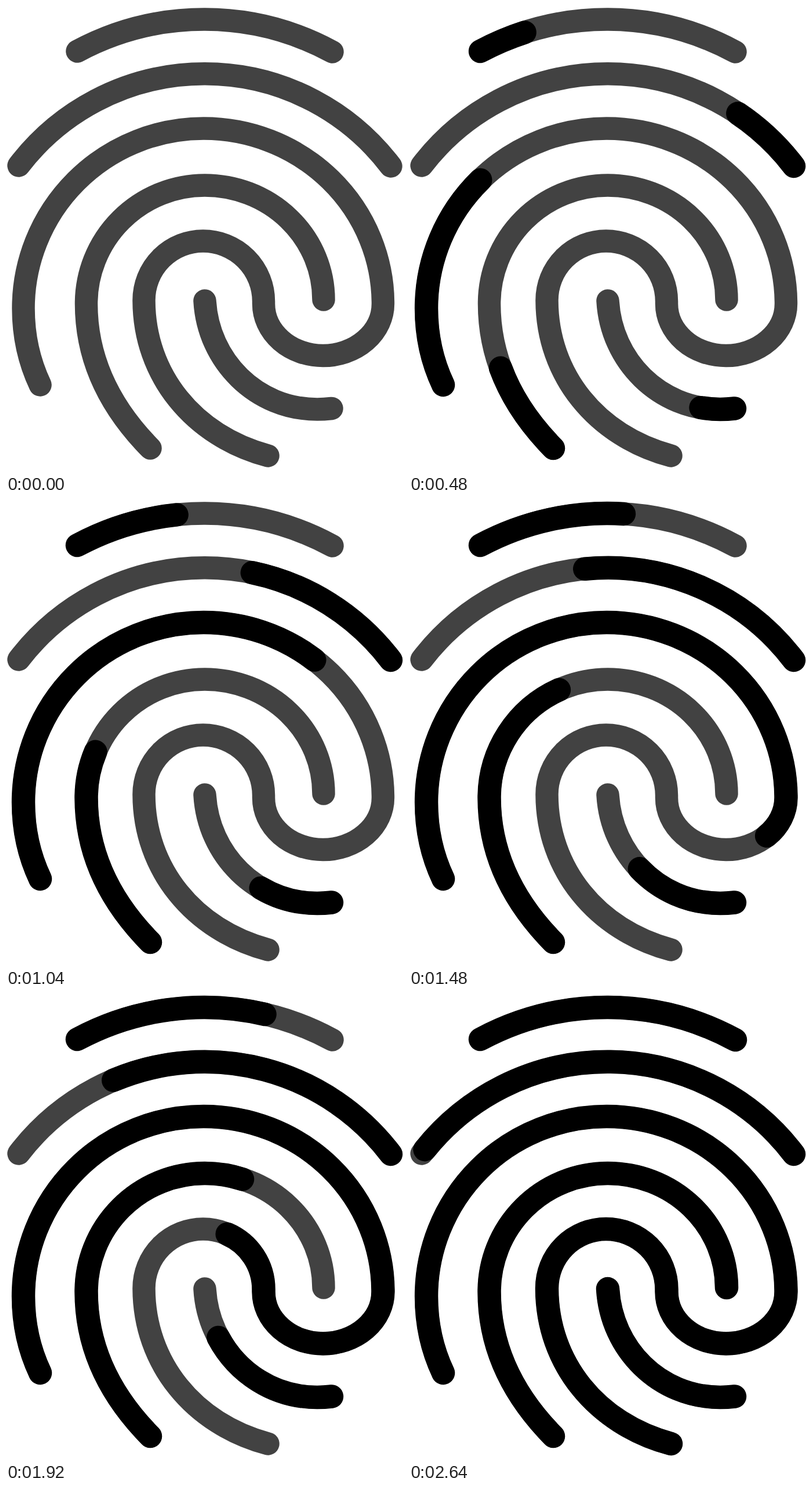
These frames come from a looping animation (685 px wide and 803 px high, 5000 ms). An HTML page:

```html
<!DOCTYPE html>
<html lang="en">
<head>
<meta charset="utf-8">
<title>Fingerprint scan</title>
<style>
  html, body { margin: 0; width: 100%; height: 100%; overflow: hidden; background: #fff; }
  svg { display: block; width: 685px; height: 803px; fill: none; stroke-linecap: round; }
  #base { stroke: #424242; stroke-width: 39.5; }
  #scan { stroke: #000; stroke-width: 40.5; }
</style>
</head>
<body>
<svg viewBox="0 0 685 803">
  <g id="base"></g>
  <g id="scan"></g>
</svg>
<script>
const LOOP = 5000, FILL = 2640, STEP = 40;

// Each ridge: centre line from the scan's starting end, and the share of it that gets filled
const ridges = [
  ["M123 78A464 464 0 0 1 563 79", 1],
  ["M664 276A404 404 0 0 0 22 275", 0.988],
  ["M59 653C40 613 30 569 30 521A311 310 0 0 1 341 211A309.5 302 0 0 1 650.5 513" +
   "A103.5 89.5 0 0 1 547 602.5A102.5 89.5 0 0 1 444.5 513V509" +
   "A104.5 104 0 0 0 340 405A102 102 0 0 0 238 507C238 636 324 741 452 775", 1],
  ["M249 762C180 692 138.5 610 138.5 513A204.5 204 0 0 1 343 309A205 197 0 0 1 548 506", 1],
  ["M562 693.5C553 694.5 545 695 537 695C432 695 349 612 343 508", 1]
];

function addPath(id, d) {
  const path = document.createElementNS("http://www.w3.org/2000/svg", "path");
  path.setAttribute("d", d);
  document.getElementById(id).append(path);
  return path;
}

const scans = ridges.map(([d, reach]) => {
  addPath("base", d);
  const path = addPath("scan", d);
  return { path, length: path.getTotalLength() * reach };
});

function draw(now) {
  const time = Math.floor((now % LOOP) / STEP) * STEP;
  const progress = Math.min(time / FILL, 1);
  for (const { path, length } of scans) {
    path.style.visibility = progress ? "visible" : "hidden";
    path.setAttribute("stroke-dasharray", `${length * progress} 9999`);
  }
}

const start = performance.now();
function tick() {
  draw(performance.now() - start);
  requestAnimationFrame(tick);
}
tick();
</script>
</body>
</html>
```
